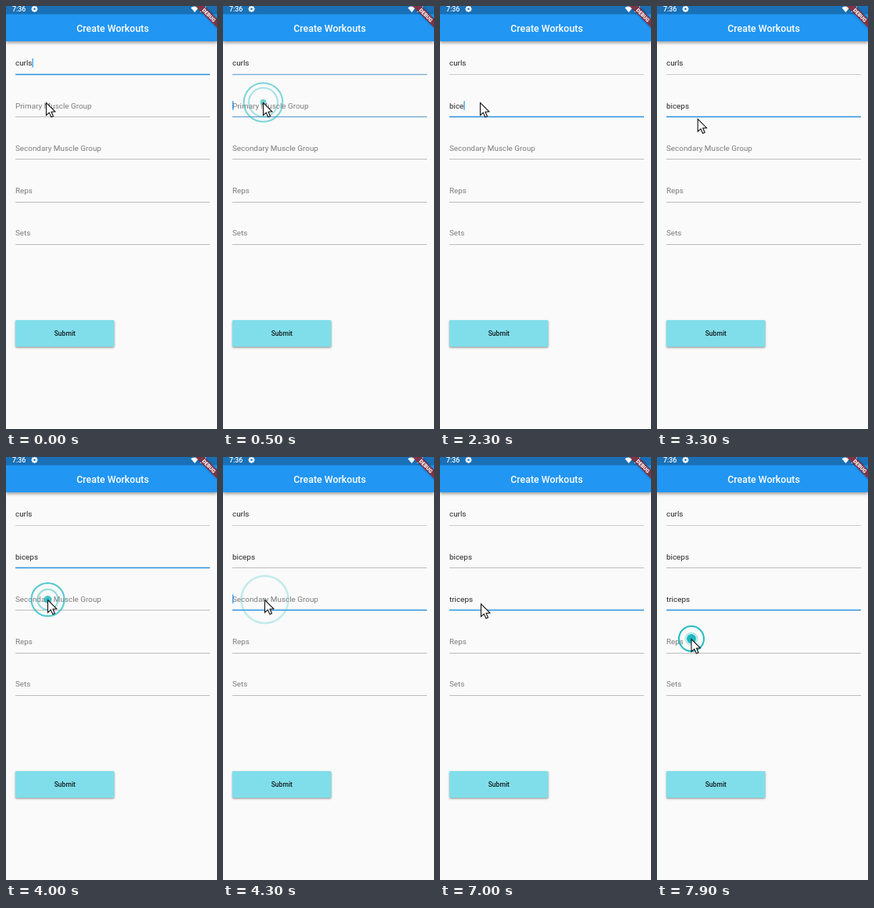
Write an HTML page with a canvas that moves like this. It is 270 by 540 pixels and loops after 8000 ms.

```html
<!DOCTYPE html>
<html lang="en">
<head>
<meta charset="utf-8">
<title>Create Workouts</title>
<style>
html, body { margin: 0; width: 100%; height: 100%; overflow: hidden; background: #fafafa; }
canvas { display: block; width: 270px; height: 540px; }
</style>
</head>
<body>
<canvas id="stage" width="270" height="540"></canvas>
<script>
const ctx = document.getElementById('stage').getContext('2d');
const LOOP = 8000, STEP = 100;
const LEFT = 12, RIGHT = 261, PITCH = 54.2;
const BLUE = '#2196f3', TEAL = '30,184,192';

// Each key is [time, number of characters typed].
const fields = [
  { hint: 'Exercise', text: 'curls', keys: [[0, 5]], focus: [0, 500], caret: [[0, 500]] },
  { hint: 'Primary Muscle Group', text: 'biceps',
    keys: [[1350, 1], [1800, 3], [2000, 4], [2400, 5], [2600, 6]],
    focus: [500, 4100], caret: [[500, 1000], [1400, 3000], [3400, 3900]] },
  { hint: 'Secondary Muscle Group', text: 'triceps',
    keys: [[5300, 1], [5500, 2], [5600, 3], [5900, 4], [6000, 5], [6300, 6], [6400, 7]],
    focus: [4100, LOOP + 1000], caret: [[4100, 4600], [5100, 7000], [7400, 7900]] },
  { hint: 'Reps', text: '', keys: [], focus: null, caret: [] },
  { hint: 'Sets', text: '', keys: [], focus: null, caret: [] }
];

const clicks = [[200, 51.5, 123], [3800, 53.5, 182], [7800, 44, 232]];
const moves = [[3100, 3600], [6900, 7400]];

const clamp = v => Math.max(0, Math.min(1, v));
const smooth = v => { v = clamp(v); return v * v * (3 - 2 * v); };

function rect(x, y, w, h, color) {
  ctx.fillStyle = color;
  ctx.fillRect(x, y, w, h);
}

function label(text, x, y, size, color, weight = 400, align = 'left') {
  ctx.font = `${weight} ${size}px Roboto, sans-serif`;
  ctx.textAlign = align;
  ctx.fillStyle = color;
  ctx.fillText(text, x, y);
}

function polygon(points, color) {
  ctx.beginPath();
  points.forEach(([x, y]) => ctx.lineTo(x, y));
  ctx.closePath();
  ctx.fillStyle = color;
  ctx.fill();
}

function disc(x, y, r, color) {
  ctx.beginPath();
  ctx.arc(x, y, r, 0, Math.PI * 2);
  ctx.fillStyle = color;
  ctx.fill();
}

function ring(x, y, r, width, color) {
  ctx.beginPath();
  ctx.arc(x, y, r, 0, Math.PI * 2);
  ctx.lineWidth = width;
  ctx.strokeStyle = color;
  ctx.stroke();
}

function withShadow(blur, dy, draw) {
  ctx.save();
  ctx.shadowColor = 'rgba(0,0,0,.4)';
  ctx.shadowBlur = blur;
  ctx.shadowOffsetY = dy;
  draw();
  ctx.restore();
}

function drawStatusIcons() {
  ctx.save();
  ctx.translate(36.5, 3.8);
  for (let i = 0; i < 4; i++) {
    rect(-1, -4, 2, 8, '#fff');
    ctx.rotate(Math.PI / 4);
  }
  ctx.restore();
  disc(36.5, 3.8, 3, '#fff');
  disc(36.5, 3.8, 1.3, '#1970b6');

  ctx.beginPath();
  ctx.moveTo(241.5, 8);
  ctx.arc(241.5, 8, 7.5, -Math.PI * 0.73, -Math.PI * 0.27);
  ctx.fillStyle = '#fff';
  ctx.fill();
  polygon([[256, 0], [256, 8], [248, 8]], '#fff');
}

function drawBanner() {
  ctx.save();
  ctx.translate(259.7, 11.7);
  ctx.rotate(Math.PI / 4);
  withShadow(3, 0, () => rect(-30, -3.9, 60, 7.8, '#7f3446'));
  label('DEBUG', 0, 2.4, 6.7, '#fff', 900, 'center');
  ctx.restore();
}

function drawHeader() {
  withShadow(4, 1.5, () => rect(0, 0, 270, 45, BLUE));
  rect(0, 0, 270, 10.5, '#1970b6');
  label('7:36', 8, 7.3, 8.8, '#fff', 500);
  drawStatusIcons();
  label('Create Workouts', 136.5, 33, 12.4, '#fff', 500, 'center');
  drawBanner();
}

function drawField(field, i, t) {
  const base = 76.4 + PITCH * i;
  const lineY = Math.round(87 + PITCH * i);
  const typed = field.keys.reduce((n, [at, count]) => t >= at ? count : n, 0);
  const text = field.text.slice(0, typed);

  const hintAlpha = field.keys.length ? clamp(1 - (t - field.keys[0][0] + 50) / 200) : 1;
  if (!typed) label(field.hint, LEFT, base, 9.9, 'rgba(0,0,0,.5)');
  else if (i > 0 && hintAlpha > 0) label(field.hint, LEFT, base, 9.9, `rgba(0,0,0,${hintAlpha / 2})`);
  label(text, LEFT, base, 9.9, 'rgba(0,0,0,.85)');

  if (field.caret.some(([on, off]) => t >= on && t < off)) {
    rect(LEFT + ctx.measureText(text).width + 0.1, base - 9.4, 1.2, 11.5, BLUE);
  }

  rect(LEFT, lineY, RIGHT - LEFT, 1, i ? '#bcbcbc' : '#cccccc');
  if (field.focus) {
    const [on, off] = field.focus;
    const glow = (on ? clamp((t - on + 100) / 200) : 1) * clamp(1 - (t - off + 100) / 200);
    ctx.globalAlpha = glow;
    rect(LEFT, lineY - 0.3, RIGHT - LEFT, 1.5, '#2e92dc');
    ctx.globalAlpha = 1;
  }
}

function drawButton() {
  withShadow(2.5, 1.2, () => {
    ctx.beginPath();
    ctx.roundRect(12, 401, 126.5, 34, 1.3);
    ctx.fillStyle = '#80deea';
    ctx.fill();
  });
  label('Submit', 75.3, 421, 8.6, 'rgba(0,0,0,.87)', 500, 'center');
}

function drawRipple(age, x, y) {
  if (age < 0 || age >= 600) return;
  const k = age / 100;
  const alpha = clamp(1.2 - k / 5);
  const teal = a => `rgba(${TEAL},${a * alpha})`;
  if (k > 0) {
    ring(x, y, 16 * k ** 0.4, 2, teal(0.95));
    ring(x, y, 7.5 + 5.5 * (k - 1), 2.2, teal(k > 1 ? 0.6 : 0.3));
  }
  disc(x, y, k > 0 ? Math.max(0, 7 - k) : 4, teal(1));
}

function drawPointer(t) {
  let [, x, y] = clicks[0];
  moves.forEach(([start, end], i) => {
    const p = smooth((t - start) / (end - start));
    x += (clicks[i + 1][1] - clicks[i][1]) * p;
    y += (clicks[i + 1][2] - clicks[i][2]) * p;
  });
  ctx.save();
  ctx.translate(x, y + 0.5);
  polygon([[0, 0], [0, 16], [3.8, 12.6], [6.4, 18.3], [9, 17.2], [6.5, 11.7], [11.4, 11.4]], '#fff');
  ctx.lineWidth = 1.1;
  ctx.strokeStyle = '#111';
  ctx.stroke();
  ctx.restore();
}

function render(now) {
  const t = Math.floor((now % LOOP) / STEP) * STEP;
  rect(0, 0, 270, 540, '#fafafa');
  drawHeader();
  fields.forEach((field, i) => drawField(field, i, t));
  drawButton();
  clicks.forEach(([at, x, y]) => drawRipple(t - at, x, y));
  drawPointer(t);
}

const begin = performance.now();
function frame() {
  render(performance.now() - begin);
  requestAnimationFrame(frame);
}
frame();
</script>
</body>
</html>
```
